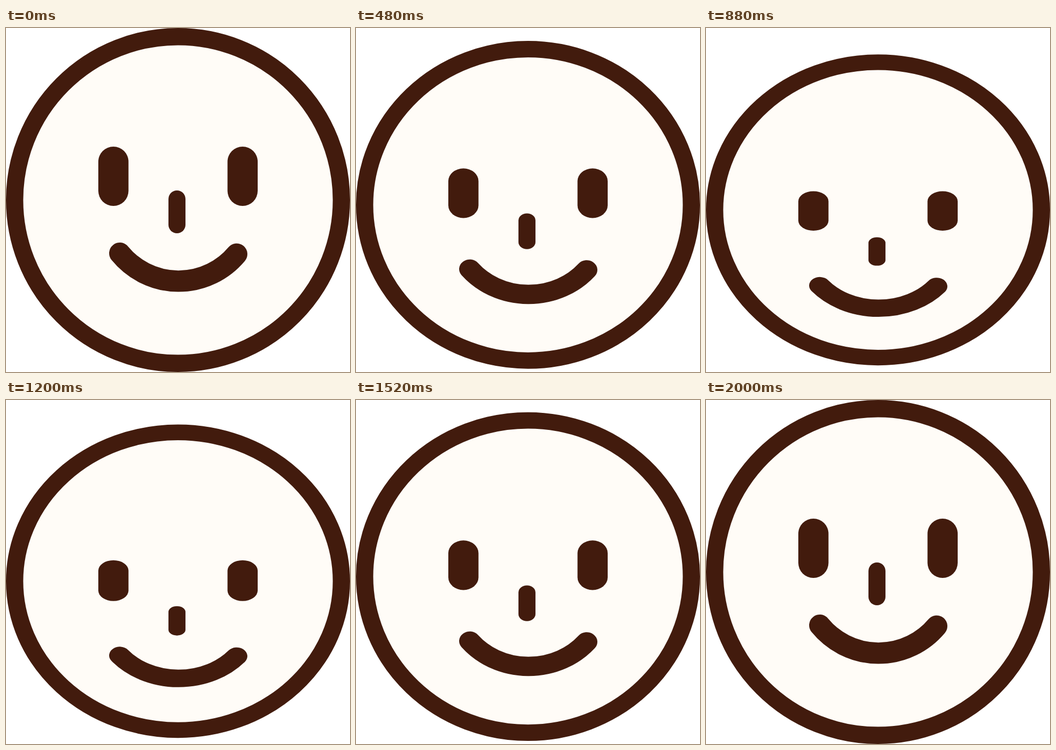
Recreate the animation shown at these times as an HTML page. Size 667 by 667 pixels, loop 2400 ms.

```html
<!DOCTYPE html>
<html lang="en">
<head>
<meta charset="utf-8">
<title>Squashing smiley</title>
<style>
html, body { margin: 0; width: 100%; height: 100%; overflow: hidden; background: #fff; }
svg { display: block; width: 100vw; height: 100vh; }
</style>
</head>
<body>
<svg viewBox="0 0 667 667" fill="#421b0d">
  <circle id="head" cx="333.5" cy="333.5" r="316.8" fill="#fffcf7" stroke="#421b0d" stroke-width="33.4"/>
  <g id="eyes">
    <rect x="179" y="230" width="58.5" height="115" rx="29.25"/>
    <rect x="429.5" y="230" width="58.5" height="115" rx="29.25"/>
  </g>
  <rect id="nose" x="315" y="315" width="33" height="83" rx="16.5"/>
  <path id="mouth" d="M220.7 436.7A147 147 0 0 0 447.3 438.4" fill="none" stroke="#421b0d" stroke-width="41.4" stroke-linecap="round"/>
</svg>
<script>
const LOOP = 2400, STEP = 40, PEAK = 1000;

const smooth = u => {
  u = Math.min(1, Math.max(0, u));
  return u * u * (3 - 2 * u);
};

// 0 at rest, 1 fully squashed
const squash = (t, end) => t < PEAK ? smooth(t / PEAK) : 1 - smooth((t - PEAK) / (end - PEAK));

// anchor: fixed y of the scaling, drop: downward shift, shrink: height lost, end: time back at rest
const parts = [
  { id: "head", anchor: 533.6, drop: 0, shrink: 0.1, end: 1967 },
  { id: "eyes", anchor: 287.5, drop: 70, shrink: 0.35, end: 2000 },
  { id: "nose", anchor: 356.5, drop: 80, shrink: 0.35, end: 2000 },
  { id: "mouth", anchor: 464, drop: 60, shrink: 0.2, end: 2000 }
];

function draw(now) {
  const t = Math.floor((now % LOOP) / STEP) * STEP;
  for (const { id, anchor, drop, shrink, end } of parts) {
    const k = squash(t, end), s = 1 - shrink * k;
    const y = anchor * (1 - s) + drop * k;
    document.getElementById(id).setAttribute("transform", `matrix(1 0 0 ${s} 0 ${y})`);
  }
}

const start = performance.now();
function tick() {
  draw(performance.now() - start);
  requestAnimationFrame(tick);
}
tick();
</script>
</body>
</html>
```
